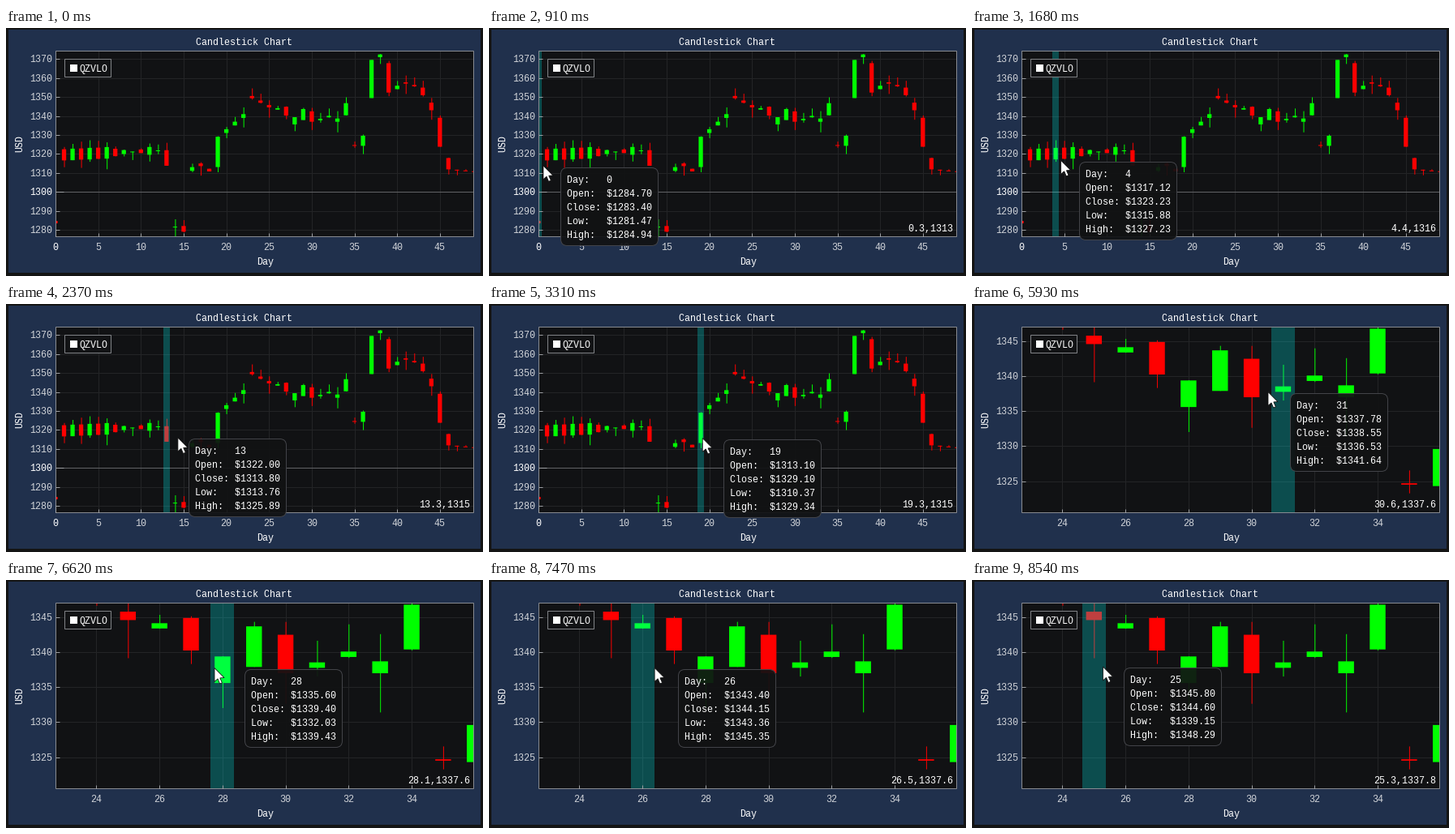
Write a matplotlib script that moves like this. It is 588 by 306 pixels and loops after 9000 ms.

```python
import numpy as np
import matplotlib.pyplot as plt
from matplotlib.animation import FuncAnimation
from matplotlib.collections import LineCollection, PolyCollection
from matplotlib.patches import FancyBboxPatch, Polygon, Rectangle

W, H, DPI = 588, 306, 100
LOOP, INTERVAL = 9000, 40
STEP = LOOP / 117                 # the interface refreshes in coarse steps
PX = 72 / DPI                     # points per pixel
LINE = 0.97 * PX
LEFT, TOP, RIGHT, BOTTOM = 61, 28, 577, 258

# Turning points of the price: half-day (even opens, odd closes), USD
TURNS = [
    (0, 1284.7), (1, 1283.4), (2, 1319.5), (26, 1322), (27, 1313.8),
    (28, 1281.3), (30, 1282), (31, 1279), (32, 1311.1), (34, 1315),
    (37, 1310.8), (38, 1313.1), (39, 1329.1), (45, 1341), (46, 1350.6),
    (52, 1343.4), (54, 1344.9), (56, 1335.6), (57, 1339.4), (58, 1337.9),
    (59, 1343.7), (60, 1342.5), (61, 1337), (65, 1340.1), (66, 1337),
    (68, 1340.4), (69, 1346.8), (70, 1324.7), (72, 1324.3), (73, 1329.6),
    (74, 1349.5), (75, 1369.6), (77, 1372.5), (78, 1367.9), (79, 1352.4),
    (82, 1357.8), (86, 1355), (90, 1339.1), (91, 1323.8), (93, 1311.9),
    (99, 1310.7)]
DAYS = np.arange(50)


def price(half):
    """Trend between turning points, plus a fading zigzag in the early days."""
    day = half // 2
    swing = np.where((day >= 1) & (day < 12), np.clip(9 - day, -2, 3), 0)
    zigzag = np.sqrt(2) * np.sin(np.pi * (half / 2 - 0.25))
    return np.interp(half, *zip(*TURNS)) + swing * zigzag


def wave(peak, period):
    return 1 + np.cos(2 * np.pi * (DAYS - peak) / period)


OPEN, CLOSE = price(2 * DAYS), price(2 * DAYS + 1)
HIGH = np.maximum(OPEN, CLOSE) + 2 * wave(32.5, 9.5)
LOW = np.minimum(OPEN, CLOSE) - 1.4 * wave(33, 2.7) ** 2

# Mouse path: step, x, y
PATH = np.array([
    (3, 73, 312), (10, 64, 172), (21, 107.3, 164.8), (23, 114, 165),
    (34, 250, 167), (38, 264.2, 167), (43, 264.2, 167), (53, 314, 150),
    (57, 365.5, 118), (59, 389, 116), (73, 389, 116), (76, 368, 110),
    (77, 366, 110), (89, 222, 110), (96, 208.4, 110), (110, 162.5, 108.5)])
ZOOM_STEPS = np.array([*range(61, 64), *range(67, 73)])   # wheel notches
ZOOM = 3.69                       # total magnification
PIVOT = (388.9, 115.9, 31.14, 1336.9)   # fixed point: x, y, day, price
SCALE = (10.53, 2.339)            # pixels per day and per dollar, unzoomed

fig = plt.figure(figsize=(W / DPI, H / DPI), dpi=DPI, facecolor="#141414")
ax = fig.add_axes([0, 0, 1, 1])
ax.set_xlim(0, W)
ax.set_ylim(H, 0)
ax.axis("off")


def box(x, y, w, h, z, fill="none", edge="none"):
    return ax.add_patch(Rectangle((x, y), w, h, fc=fill, ec=edge, lw=LINE, zorder=z))


def label(x, y, s="", ha="left", color="white", z=7, va="baseline", **kw):
    return ax.text(x, y, s, ha=ha, va=va, color=color, zorder=z,
                   family="Liberation Mono", size=11.67 * PX, **kw)


def add_clipped(coll):
    ax.add_collection(coll, autolim=False)
    coll.set_clip_path(plot_bg)
    return coll


def segments(x0, y0, x1, y1):
    return np.stack([np.column_stack([x0, y0]), np.column_stack([x1, y1])], axis=1)


box(3, 2, 582, 300, 1, "#20304c")
plot_bg = box(LEFT, TOP, RIGHT - LEFT, BOTTOM - TOP, 2, "#111214")
box(LEFT, TOP, RIGHT - LEFT - 1, BOTTOM - TOP - 1, 6, edge="#8b8e94")

label(293.5, 21, "Candlestick Chart", "center")
label(319.5, 292, "Day", "center")
label(17, 142.5, "USD", "center", va="center", rotation=90)

box(72, 38, 57, 22, 7, "#121315", "#84868a")
box(79, 45, 9, 9, 8, "white")
label(90.5, 54, "QZVLO", z=8)

candle_colors = np.where(CLOSE > OPEN, "#00ff00", "#ff0000")
grid = add_clipped(LineCollection([], linewidths=LINE, zorder=3))
wicks = add_clipped(LineCollection([], linewidths=LINE, colors=candle_colors,
                                   snap=False, zorder=4))
bodies = add_clipped(PolyCollection([], facecolors=candle_colors, linewidths=0,
                                    edgecolors="none", snap=False, zorder=4))
ticks = add_clipped(LineCollection([], linewidths=LINE, colors="#a0a2a6", zorder=6))
band = box(0, TOP, 8, BOTTOM - TOP, 5, (0, 1, 1, 0.25))
band.set_clip_path(plot_bg)

x_labels = [label(0, 274, ha="center") for _ in range(14)]
y_labels = [label(57, 0, ha="right") for _ in range(14)]
readout = label(572, 251, ha="right")

tip = ax.add_patch(FancyBboxPatch(
    (0, 0), 120, 96, boxstyle="round,pad=0,rounding_size=8",
    fc=(0.067, 0.07, 0.075, 0.93), ec="#44454a", lw=LINE, zorder=8))
tip_lines = [label(0, 0, z=9) for _ in range(5)]

ARROW = np.array([(0, 0), (0, 17), (4, 13.4), (6.6, 19.5), (9.4, 18.3),
                  (6.8, 12.4), (12, 12.1)])
cursor = ax.add_patch(Polygon(ARROW, closed=True, fc="white", ec="#101010",
                              lw=0.8 * PX, zorder=10))


class View:
    """Maps days and prices to pixels at one magnification."""

    def __init__(self, zoom):
        self.px, self.py, self.day0, self.price0 = PIVOT
        self.sx, self.sy = (s * zoom for s in SCALE)

    def x(self, day):
        return self.px + self.sx * (day - self.day0)

    def y(self, usd):
        return self.py - self.sy * (usd - self.price0)

    def day(self, x):
        return self.day0 + (x - self.px) / self.sx

    def usd(self, y):
        return self.price0 - (y - self.py) / self.sy


def mouse(step):
    return np.array([np.interp(step, PATH[:, 0], PATH[:, i]) for i in (1, 2)])


def tick_values(lo, hi, scale, min_gap):
    """Round values in range, and which of them are major."""
    gap = next(g for g in (1, 2, 5, 10, 20) if g * scale >= min_gap)
    values = np.arange(np.ceil(lo / gap - 0.01) * gap, hi + 0.01, gap).astype(int)
    return values, values % (10 * gap) == 0


def fill_labels(pool, values, major, place):
    for i, text in enumerate(pool):
        text.set_visible(i < len(values))
        if i < len(values):
            text.set_text(str(values[i]))
            text.set_color("white" if major[i] else "#d0d3d8")
            place(text, values[i])


def draw_axes(view):
    xs, x_major = tick_values(view.day(LEFT), view.day(RIGHT), view.sx, 45)
    ys, y_major = tick_values(view.usd(BOTTOM), view.usd(TOP), view.sy, 20)
    gx, gy = view.x(xs), view.y(ys)
    x0, y0 = np.full_like(gy, LEFT), np.full_like(gx, BOTTOM)
    grid.set_segments([*segments(gx, y0, gx, y0 * 0 + TOP),
                       *segments(x0, gy, x0 * 0 + RIGHT, gy)])
    grid.set_color(np.where([*x_major, *y_major], "#646568", "#242527"))
    ticks.set_segments([*segments(gx, y0, gx, y0 - 5 - 5 * x_major),
                        *segments(x0, gy, x0 + 5 + 5 * y_major, gy)])
    fill_labels(x_labels, xs, x_major, lambda t, v: t.set_x(view.x(v)))
    fill_labels(y_labels, ys, y_major, lambda t, v: t.set_y(view.y(v) + 4))


def draw_candles(view):
    x = view.x(DAYS)
    wicks.set_segments(segments(x + 0.5, view.y(LOW), x + 0.5, view.y(HIGH)))
    top = view.y(np.maximum(OPEN, CLOSE))
    bottom = np.maximum(view.y(np.minimum(OPEN, CLOSE)), top + 1)
    l, r = x - view.sx / 4, x + view.sx / 4
    corners = ((l, top), (r, top), (r, bottom), (l, bottom))
    bodies.set_verts(np.stack([np.column_stack(c) for c in corners], axis=1))


def draw_hover(view, mx, my):
    inside = LEFT <= mx <= RIGHT and TOP <= my <= BOTTOM
    for artist in (band, readout, tip, *tip_lines):
        artist.set_visible(inside)
    if not inside:
        return
    day = int(np.clip(round(view.day(mx)), 0, len(DAYS) - 1))
    l, r = (round(view.x(day + side)) for side in (-0.375, 0.375))
    band.set_x(l)
    band.set_width(r - l)
    decimals = 1 if view.sy > 5 else 0
    readout.set_text(f"{view.day(mx):.1f},{view.usd(my):.{decimals}f}")

    tx = round(mx + 24.5) + 0.5
    ty = min(round(my), H - 97) + 0.5
    tip.set_bounds(tx, ty, 120, 96)
    rows = [f"Day:   {day}"]
    rows += [f"{name + ':':<7}${data[day]:.2f}" for name, data in
             (("Open", OPEN), ("Close", CLOSE), ("Low", LOW), ("High", HIGH))]
    for i, (text, row) in enumerate(zip(tip_lines, rows)):
        text.set_text(row)
        text.set_position((tx + 7.5, ty + 18.5 + 17 * i))


def update(n):
    step = int((n * INTERVAL + 30) / STEP)
    notches = np.count_nonzero(ZOOM_STEPS <= step)
    view = View(ZOOM ** (notches / len(ZOOM_STEPS)))
    draw_axes(view)
    draw_candles(view)
    draw_hover(view, *mouse(step - 1))    # the interface trails the pointer
    cursor.set_visible(step >= 4)
    cursor.set_xy(ARROW + mouse(step) - (1, 1.5))


anim = FuncAnimation(fig, update, frames=LOOP // INTERVAL, interval=INTERVAL,
                     repeat=True, repeat_delay=0, blit=False)
plt.show()
```
